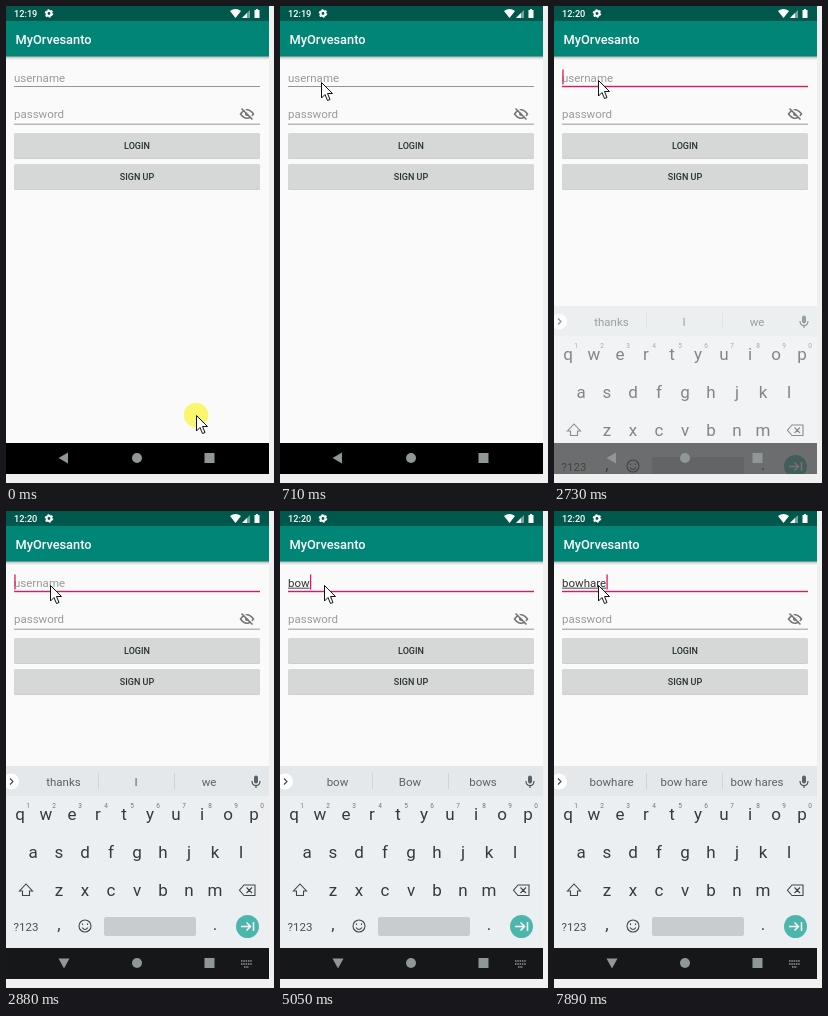
These frames come from a looping animation (268 by 477 pixels, 8 s). An HTML page:

```html
<!DOCTYPE html>
<html lang="en">
<head>
<meta charset="utf-8">
<title>Sign-in screen</title>
<style>
html, body { margin: 0; height: 100%; overflow: hidden; background: #f0f0f0; }
svg { display: block; width: 100vw; height: 100vh; font: 11.5px Roboto, Arial, sans-serif; }
.mid { text-anchor: middle; }
.bold { font-weight: 500; }
.hint { fill: #9a9a9a; }
.line { fill: none; stroke: #3f474b; stroke-width: 1.1; }
.key { font-size: 17px; fill: #343a3d; }
.digit { font-size: 6.5px; fill: #70777a; }
#halo { fill: #fffb70; mix-blend-mode: multiply; }
</style>
</head>
<body>
<svg viewBox="0 0 268 477">
  <defs>
    <clipPath id="screen"><rect width="263" height="468"/></clipPath>
    <linearGradient id="shade" x2="0" y2="1">
      <stop stop-color="#000" stop-opacity=".28"/>
      <stop offset="1" stop-color="#000" stop-opacity="0"/>
    </linearGradient>
  </defs>
  <rect width="268" height="477" fill="#f0f0f0"/>
  <g clip-path="url(#screen)">
    <rect width="263" height="468" fill="#fafafa"/>
    <rect y="50" width="263" height="4" fill="url(#shade)"/>
    <rect width="263" height="50.5" fill="#008577"/>
    <rect width="263" height="15" fill="#00574b"/>
    <g fill="#fff">
      <text id="clock" class="bold" x="8" y="10.7" font-size="9.2"></text>
      <circle cx="43" cy="7.5" r="2.4" fill="none" stroke="#fff" stroke-width="2"/>
      <circle cx="43" cy="7.5" r="3.7" fill="none" stroke="#fff" stroke-width="1.2" stroke-dasharray="1.9 1.97"/>
      <path d="M224 5Q229.500 1 235 5L229.500 12Z"/>
      <path d="M236 12L244 4V12Z" opacity=".45"/>
      <path d="M236 12L241 7V12Z"/>
      <path d="M248.500 4H250V3H252V4H253.500V12H248.500Z"/>
      <text class="bold" x="9.5" y="38" font-size="12.8">MyOrvesanto</text>
    </g>

    <text id="userHint" class="hint" x="8" y="75.6">username</text>
    <text id="typed" x="8" y="75.6" fill="#333"></text>
    <rect id="compose" x="8" y="76.700" height=".9" fill="#333"/>
    <rect x="8" y="80" width="246" height=".9" fill="#8b8b8b"/>
    <rect id="focus" x="8" y="79.800" width="246" height="1.400" fill="#d81b60"/>
    <rect id="caret" y="63.500" width="1.300" height="15" fill="#d81b60"/>
    <text class="hint" x="8" y="111.6">password</text>
    <rect x="8" y="117.700" width="246" height=".9" fill="#8b8b8b"/>
    <g fill="none" stroke="#6f7373" stroke-width="1.500">
      <path d="M234.500 108Q241 99.500 247.500 108Q241 116.500 234.500 108Z"/>
      <circle cx="241" cy="108" r="2" fill="#6f7373" stroke="none"/>
      <path d="M236.500 101.500L247.500 112.500" stroke="#fafafa"/>
      <path d="M235.500 102.500L246.500 113.500"/>
    </g>
    <g id="buttons"></g>

    <g id="keyboard">
      <rect y="255" width="263" height="214" fill="#eceff1"/>
      <rect y="255" width="263" height="30" fill="#e4e8ea"/>
      <path d="M92.500 262V278M168.500 262V278" stroke="#cfd4d6"/>
      <circle cx="5" cy="270.500" r="8" fill="#fff"/>
      <path class="line" d="M4 267.500L7 270.500L4 273.500" stroke-width="1.300"/>
      <g id="words" class="mid" fill="#596267"></g>
      <rect x="248" y="264.500" width="4" height="8" rx="2" fill="#596267"/>
      <path class="line" d="M246 270Q246 274.500 250 274.500T254 270M250 274.500V277"/>
      <g id="keys" class="mid"></g>
      <path class="line" d="M20 373L26.500 380H23.500V384.500H16.500V380H13.500Z"/>
      <path class="line" d="M238 374H249V384.500H238L233.500 379.250ZM240.500 376.500L246 382M246 376.500L240.500 382"/>
      <text class="mid" x="20" y="419.5" fill="#474f53">?123</text>
      <circle class="line" cx="79" cy="415" r="6"/>
      <path class="line" d="M76 416.500Q79 420.500 82 416.500M76.500 412.500V414M81.500 412.500V414"/>
      <rect x="98" y="406" width="92" height="19" rx="2" fill="#c7cccf"/>
      <circle cx="241.500" cy="415.500" r="11.500" fill="#4db6ac"/>
      <path d="M235 415.500H244M240.500 411.500L244.500 415.500L240.500 419.500M247.500 411V420" fill="none" stroke="#fff" stroke-width="1.500"/>
    </g>

    <rect id="nav" y="437" width="263" height="31"/>
    <g fill="#8f9797">
      <path id="back"/>
      <circle cx="131" cy="452" r="5"/>
      <rect x="198.500" y="447" width="10" height="10"/>
      <path id="switcher" d="M235 450H246M235 453H246M238 456H243" stroke="#8f9797" stroke-width="1.500" stroke-dasharray="1.500 .8"/>
    </g>
  </g>
  <circle id="halo" r="12.200"/>
  <path id="pointer" d="M.5 .5V16L4 12.500L6.500 18.500L9 17.500L6.500 11.500H11.500Z" fill="#fff" stroke="#111" stroke-linejoin="round"/>
</svg>
<script>
const LOOP = 8000;
const $ = id => document.getElementById(id);

function add(parent, tag, attrs, text = "") {
  const el = document.createElementNS("http://www.w3.org/2000/svg", tag);
  for (const name in attrs) el.setAttribute(name, attrs[name]);
  el.textContent = text;
  return $(parent).appendChild(el);
}

[["LOGIN", 127], ["SIGN UP", 158]].forEach(([label, y]) => {
  add("buttons", "rect", { x: 8, y: y + 0.8, width: 246, height: 25, rx: 1.5, fill: "#bfc1c1" });
  add("buttons", "rect", { x: 8, y, width: 246, height: 25, rx: 1.5, fill: "#d6d7d7" });
  add("buttons", "text", { class: "mid bold", x: 131, y: y + 15.6, "font-size": 9, fill: "#24322f" }, label);
});

[["qwertyuiop", 14, 309], ["asdfghjkl", 27, 346.5], ["zxcvbnm", 53, 384.5]].forEach(([row, x0, y], r) => {
  [...row].forEach((letter, i) => {
    const x = x0 + 26 * i;
    add("keys", "text", { class: "key", x, y }, letter);
    if (r === 0) add("keys", "text", { class: "digit", x: x + 8, y: 296.5 }, (i + 1) % 10);
  });
});
add("keys", "text", { class: "key", x: 53, y: 419 }, ",");
add("keys", "text", { class: "key", x: 209, y: 419 }, ".");

const words = [57.5, 130, 203].map(x => add("words", "text", { x, y: 275 }));

// Each track holds [start, ...values]; values last until the next start.
const pointerTrack = [
  [0, 190, 409], [80, 150, 339], [170, 78, 200], [250, 11, 94], [330, 16, 81],
  [500, 20, 77], [570, 28, 77], [640, 36, 76], [710, 41, 76], [1490, 42, 75], [1560, 44, 74]
];
const focusTrack = [[0, 0], [1960, 0.35], [2030, 0.7], [2100, 1]];
const caretTrack = [
  [0, 0], [2570, 1], [3110, 0], [3490, 1], [5300, 0],
  [5530, 1], [6070, 0], [6840, 1], [7150, 0], [7470, 1]
];
// Keyboard: drop in pixels, its opacity, opacity of the navigation bar
const slideTrack = [[0, 220, 0, 1], [2730, 45, 0.6, 0.55], [2800, 12, 0.9, 0.85], [2880, 0, 1, 1]];
const typeTrack = [[0, 0], [4120, 1], [4820, 2], [5050, 3], [6840, 4], [7470, 5], [7890, 7]];
const wordTrack = [
  [0, "thanks", "I", "we"], [4570, "b", "B", "be"], [5050, "bow", "Bow", "bows"],
  [7570, "bowh", "bow", "bows"], [7890, "bowhare", "bow hare", "bow hares"]
];

const at = (track, t) => track.filter(step => step[0] <= t).pop().slice(1);
const set = (id, name, value) => $(id).setAttribute(name, value);

function draw(t) {
  const [x, y] = at(pointerTrack, t);
  set("pointer", "transform", `translate(${x} ${y})`);
  set("halo", "transform", `translate(${x} ${y})`);
  set("halo", "opacity", t < 710 ? 1 : 0);
  $("clock").textContent = t < 1870 ? "12:19" : "12:20";

  const [drop, alpha, bar] = at(slideTrack, t);
  const open = t >= 2800;
  set("keyboard", "transform", `translate(0 ${drop})`);
  set("keyboard", "opacity", alpha);
  set("nav", "opacity", bar);
  set("nav", "fill", open ? "#151718" : "#000");
  set("back", "d", open ? "M52.500 447.500H63.500L58 457.500Z" : "M52.500 452L62 446.500V457.500Z");
  set("switcher", "opacity", open ? 1 : 0);

  const [count] = at(typeTrack, t);
  $("typed").textContent = "bowhare".slice(0, count);
  const width = count ? $("typed").getComputedTextLength() : 0;
  set("userHint", "opacity", count ? 0 : 1);
  set("compose", "width", width);
  set("focus", "opacity", at(focusTrack, t)[0]);
  set("caret", "x", 8.3 + width);
  set("caret", "opacity", at(caretTrack, t)[0]);
  at(wordTrack, t).forEach((word, i) => words[i].textContent = word);
}

const start = performance.now();
function tick() {
  draw((performance.now() - start) % LOOP);
  requestAnimationFrame(tick);
}
tick();
</script>
</body>
</html>
```
